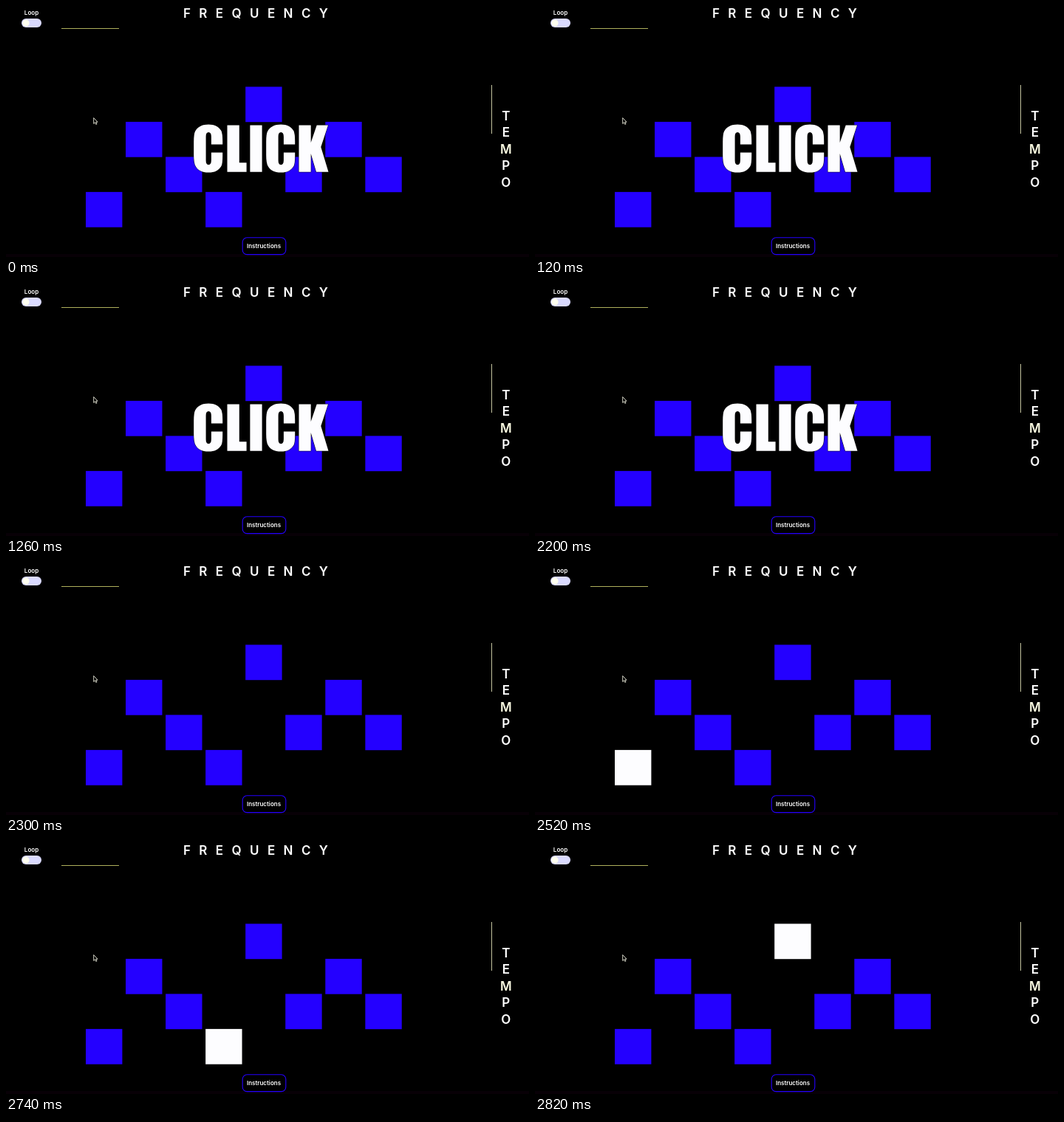
Write an HTML page that moves like this. It is 708x340 px and loops after 2840 ms.

```html
<!DOCTYPE html>
<html lang="en">
<head>
<meta charset="utf-8">
<title>Step sequencer</title>
<style>
  html, body { margin: 0; width: 100%; height: 100%; overflow: hidden; background: #000; }
  svg { display: block; width: 708px; height: 340px; }
  text { font-family: Inter, "Open Sans", sans-serif; font-weight: 600; fill: #fff; }
  .small { font-size: 8px; text-anchor: middle; }
  .title { font-size: 17px; letter-spacing: 11.4px; }
  .tempo { font-size: 17px; text-anchor: middle; }
  #caption { fill: #fdfdff; stroke: #000; paint-order: stroke; }
</style>
</head>
<body>
<svg viewBox="0 0 708 340">
  <rect width="708" height="340"/>
  <rect y="336" width="708" height="4" fill="#080006"/>

  <text class="small" x="34.5" y="12.2">Loop</text>
  <rect x="21" y="17" width="27" height="12" rx="6" fill="#dadaff"/>
  <circle cx="27" cy="23" r="4.6" fill="#fffff0"/>
  <path d="M75 30.5H153" stroke="#aeb05c"/>
  <path d="M657.5 107V173" stroke="#c4c4a0"/>
  <text class="title" x="239.9" y="16.2">FREQUENCY</text>
  <g id="tempo"></g>

  <g id="steps"></g>

  <path d="M118.7 151.5V159.4L120.5 157.8L121.8 160.4L123 159.8L121.8 157.2H124Z" stroke="#e8e8d8" stroke-width=".9"/>
  <rect x="320.2" y="313.8" width="58.6" height="22.8" rx="6" stroke="#2400ff" stroke-width="1.1"/>
  <text class="small" x="349" y="328">Instructions</text>

  <!-- Heavy condensed lettering -->
  <g id="caption" role="img" aria-label="CLICK">
    <path id="c" transform="translate(254.2 160)" d="M39 27.5H23.7V17Q23.7 11 20 11T16.4 17V49Q16.4 55 20 55T23.7 49V38.5H39V43Q39 54 37.2 57C33.5 62.7 28.5 65.6 20 65.6C11 65.6 5 62 2.5 57Q0 53 0 42V24Q0 13 2 9.5C5 3.7 11 .4 20 .4C28.5 .4 34 3.7 37.2 9Q39 13 39 23Z"/>
    <path d="M299.5 161.4H315.8V212.2H325.6V224.8H299.5ZM330.4 161.4H346.6V224.8H330.4Z"/>
    <use href="#c" x="98"/>
    <path d="M396.5 161.4H412.7V185L420.7 161.4H436L426.3 191L436.5 224.8H420L412.7 200V224.8H396.5Z"/>
  </g>
</svg>
<script>
const LOOP = 2840;
const CAPTION_END = 2300;
const stepRows = [3, 1, 2, 3, 0, 2, 1, 2];
const stepTimes = [2520, 2620, 2670, 2740, 2820];

function add(parent, tag, attributes) {
  const node = document.createElementNS("http://www.w3.org/2000/svg", tag);
  for (const name in attributes) node.setAttribute(name, attributes[name]);
  return document.getElementById(parent).appendChild(node);
}

[..."TEMPO"].forEach((letter, i) => {
  const node = add("tempo", "text", { class: "tempo", x: 676.8, y: 154.8 + 22.5 * i });
  node.textContent = letter;
  if (letter === "M") node.style.fill = "#fbfbe2";
});

const steps = stepRows.map((row, column) => add("steps", "rect", {
  x: 108 + 54.05 * column, y: 109.4 + 47.5 * row, width: 49.4, height: 47.8
}));
const caption = document.getElementById("caption");

function draw(now) {
  const time = now % LOOP;
  const active = stepTimes.filter(start => time >= start).length - 1;
  steps.forEach((step, i) => step.setAttribute("fill", i === active ? "#fdfdff" : "#2400ff"));
  caption.style.display = time < CAPTION_END ? "" : "none";
}

const start = performance.now();
function tick() {
  draw(performance.now() - start);
  requestAnimationFrame(tick);
}
tick();
</script>
</body>
</html>
```
